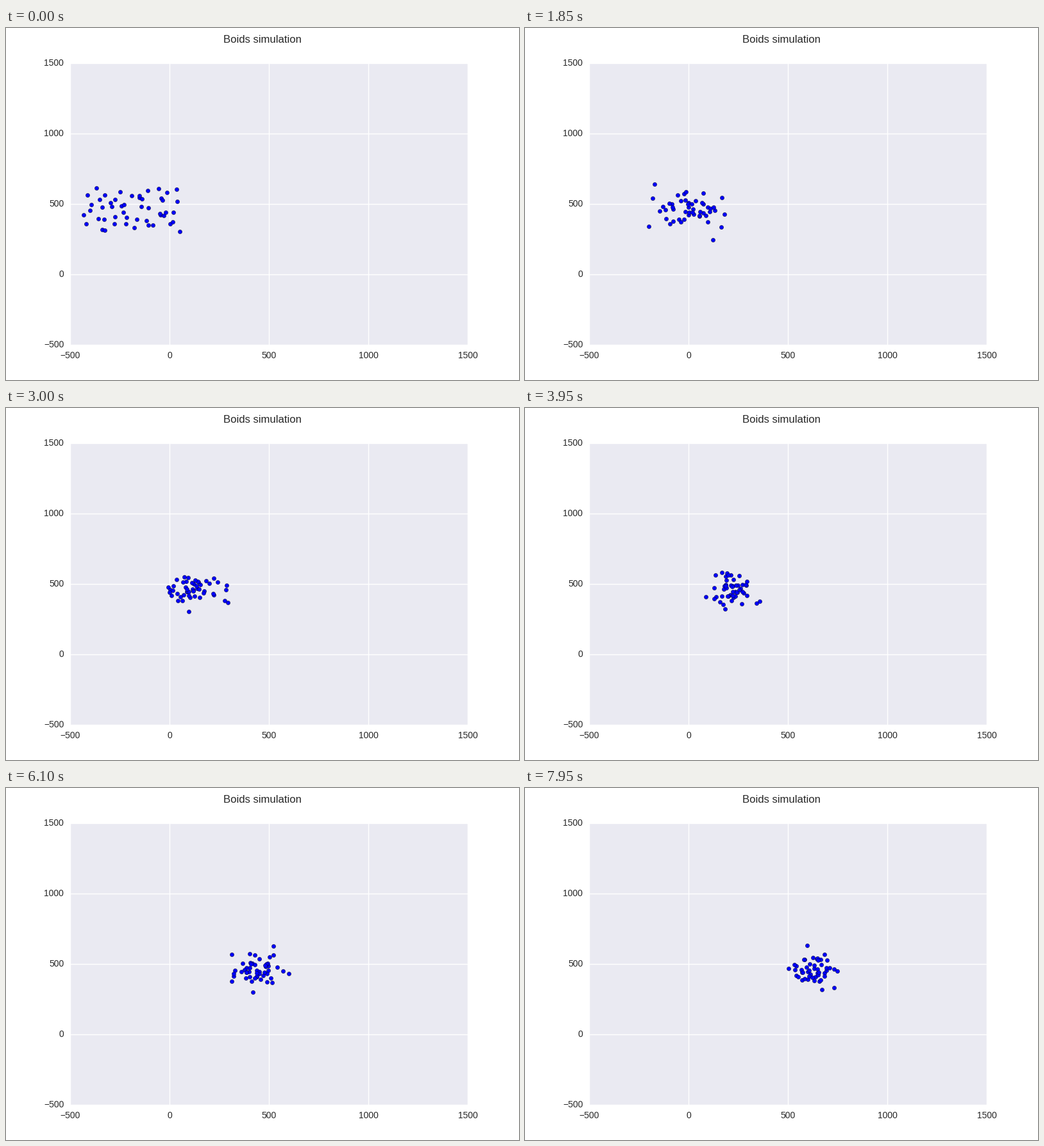
A matplotlib script that plays this animation: 800x550 px, repeating every 8 s.

```python
import numpy as np
import matplotlib.pyplot as plt
from matplotlib.animation import FuncAnimation

FRAMES = 160
INTERVAL = 50
COLS, ROWS = 10, 5
COHESION = 0.01
ALIGNMENT = 0.125
AVOID_RADIUS = 10
ALIGN_RADIUS = 100
CENTER = np.array([-187, 462])   # flock centre at the start
DRIFT = np.array([5.13, -0.03])  # mean flock velocity per frame
INK = "0.15"


def recenter(values, mean):
    return values + mean - values.mean(axis=0)


def launch(rng):
    """Scatter one boid in each cell of the starting area."""
    n = COLS * ROWS
    col, row = np.arange(n) % COLS, np.arange(n) // COLS
    x = (col + rng.uniform(0, 1, n)) * 490 / COLS
    y = (row + rng.uniform(0, 1, n)) * 315 / ROWS
    vx = rng.uniform(0, 10, n)
    vy = rng.uniform(-20, 20, n)
    return (recenter(np.column_stack([x, y]), CENTER),
            recenter(np.column_stack([vx, vy]), DRIFT))


def step(pos, vel):
    """Advance the flock: cohesion, separation, alignment, then move."""
    gap = pos[None, :, :] - pos[:, None, :]
    dist2 = (gap ** 2).sum(axis=2)
    near = (dist2 < AVOID_RADIUS ** 2)[:, :, None]
    mates = (dist2 < ALIGN_RADIUS ** 2)[:, :, None]

    vel = vel + COHESION * gap.mean(axis=1) - (gap * near).sum(axis=1)
    diff = vel[None, :, :] - vel[:, None, :]
    vel = vel + ALIGNMENT * (diff * mates).mean(axis=1)
    return pos + vel, vel


def simulate():
    pos, vel = launch(np.random.default_rng(12))
    path = [pos]
    for _ in range(FRAMES - 1):
        pos, vel = step(pos, vel)
        path.append(pos)
    return path


plt.rcParams.update({
    "font.family": "Liberation Sans",
    "text.kerning_factor": 6,
    "ytick.alignment": "center",
})
path = simulate()

fig = plt.figure(figsize=(8, 5.5), dpi=100, facecolor="white")
ax = fig.add_axes([0.125, 0.1, 0.775, 0.8], facecolor="#eaeaf2")
ax.set(xlim=(-500, 1500), ylim=(-500, 1500))
ticks = np.arange(-500, 1501, 500)
ax.set_xticks(ticks)
ax.set_yticks(ticks)
ax.set_axisbelow(True)
ax.grid(color="white", linewidth=1, linestyle="-")
ax.tick_params(length=0, pad=7, labelsize=10, labelcolor=INK)
for spine in ax.spines.values():
    spine.set_visible(False)
fig.suptitle("Boids simulation", fontsize=12, color=INK, y=0.98)

dots = ax.scatter(path[0][:, 0], path[0][:, 1], s=20, c="blue",
                  edgecolors="black", linewidths=0.3)


def draw(i):
    dots.set_offsets(path[i])
    return dots,


anim = FuncAnimation(fig, draw, frames=FRAMES, interval=INTERVAL,
                     repeat=True, repeat_delay=0)
plt.show()
```
